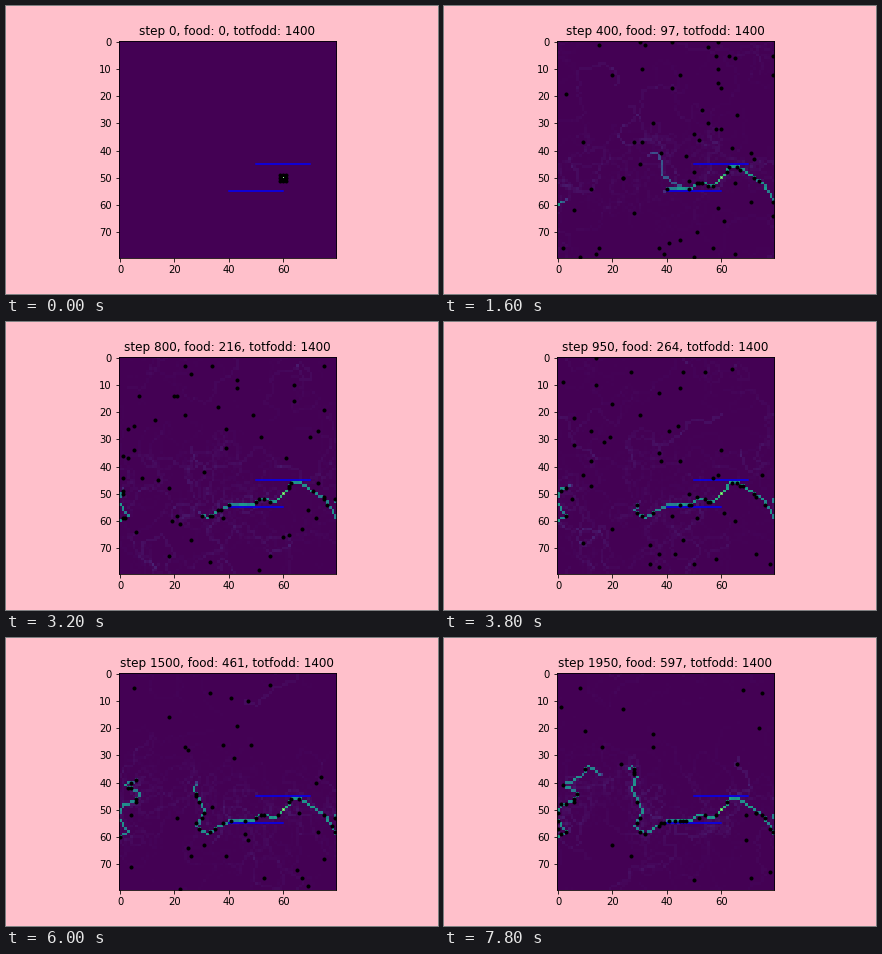
Animation, 432 px wide and 288 px high, one loop 8000 ms. Source, as a matplotlib script:

```python
import numpy as np
import matplotlib.pyplot as plt
from matplotlib.animation import FuncAnimation

N = 80
STEP = 50
FRAMES = 40
GROWTH = 0.0247  # trail cells gained per step
NEST = (60, 50)

# Key points of each trail in grid cells; x runs past the edge where the world wraps.
EAST = [NEST, (63, 46), (66, 46), (75, 52), (80, 60), (83, 58), (79, 53),
        (81, 48), (86, 47), (87, 44), (82, 41), (88, 38), (91, 34), (97, 38)]
WEST = [NEST, (57, 53), (52, 52), (48, 54), (40, 54), (32, 59), (28, 56),
        (31, 51), (27, 42), (29, 38), (27, 34), (25, 36)]
DETOUR = [(46, 54), (38, 49), (38, 44), (36, 41), (31, 42)]

# Food gathered so far, (step, count)
FOOD = np.array([(0, 0), (400, 97), (600, 153), (950, 264),
                 (1300, 392), (1700, 530), (1950, 597)]).T


def raster(points):
    """Grid cells along a polyline, as columns x and y."""
    cells = []
    for a, b in zip(points, points[1:]):
        n = np.abs(np.subtract(b, a)).max()
        cells.append(np.linspace(a, b, n, endpoint=False))
    return np.rint(np.vstack(cells)).astype(int) % N


def make_wisp(rng):
    """A faint curling track that starts near a trail or anywhere."""
    if rng.random() < 0.5:
        trail = east if rng.random() < 0.5 else west
        start = trail[rng.integers(len(trail))]
    else:
        start = rng.uniform(0, N, 2)
    turn = rng.uniform(0, 2 * np.pi) + np.cumsum(rng.normal(0, 0.55, 50))
    path = start + np.cumsum(np.stack([np.cos(turn), np.sin(turn)], 1), 0)
    level = rng.uniform(0.01, 0.06) * np.linspace(1, 0.3, 50)
    return rng.uniform(0, FRAMES * STEP), np.rint(path).astype(int) % N, level


rng = np.random.default_rng(7)
east, west, detour = map(raster, (EAST, WEST, DETOUR))
grain = rng.uniform(0.85, 1.12, (N, N))
wisps = [make_wisp(rng) for _ in range(260)]


def head(step, lead):
    """Length of a trail in cells."""
    return min(1, step / 300) * (lead + GROWTH * step)


def lay(grid, trail, length, level):
    x, y = trail.T
    i = np.arange(len(trail))
    near = 1 + 0.25 * np.exp(-i / 6)
    value = level * near * np.clip((length - i) / 3, 0, 1) * grain[y, x]
    np.maximum.at(grid, (y, x), value)


def scent(step):
    grid = np.zeros((N, N))
    for born, path, level in wisps:
        age = step - born
        if age > 0:
            fade = min(1, age / 40) * np.exp(-age / 220)
            np.add.at(grid, (path[:, 1], path[:, 0]), level * fade)
    grid = np.minimum(grid, 0.15)
    lay(grid, east, head(step, 18), 0.48)
    lay(grid, west, head(step, 12), 0.48)
    lay(grid, detour, step / 20, 0.25 * np.exp(-((step - 400) / 170) ** 2))
    grid[NEST[1], NEST[0]] = 0.75
    return grid


def ants(step):
    if step == 0:
        return [(NEST[0] + dx, NEST[1] + dy) for dx in (-1, 0, 1) for dy in (-1, 0, 1)]
    rng = np.random.default_rng(100 + step)
    reach = 40 * min(1, step / 250)
    roam = NEST + rng.uniform(-reach, reach, (int(70 - step * 0.024), 2))
    groups = [np.rint(roam).astype(int) % N]
    for trail, lead in ((east, 18), (west, 12)):
        live = trail[2:int(head(step, lead))]
        count = min(len(live), 5 + step // 160)
        groups.append(rng.choice(live, count, replace=False))
    return np.vstack(groups)


plt.rcParams["font.family"] = "DejaVu Sans"
fig = plt.figure(figsize=(6, 4), dpi=72, facecolor="pink")
fig.subplots_adjust(left=0.125, right=0.9, bottom=0.125, top=0.88)
ax = fig.add_subplot()
image = ax.imshow(np.zeros((N, N)), cmap="viridis", vmin=0, vmax=1,
                  interpolation="nearest")
for left, y in ((50, 45), (40, 55)):
    ax.plot([left, left + 20], [y, y], "b", lw=1.5)
dots, = ax.plot([], [], "k.", ms=6)
ax.plot(*NEST, ",", color="palegreen")
title = ax.set_title("", fontsize=12)
ax.set(xlim=(-0.5, N - 0.5), ylim=(N - 0.5, -0.5),
       xticks=range(0, N, 20), yticks=range(0, N, 10))


def draw(frame):
    step = frame * STEP
    image.set_data(scent(step))
    dots.set_data(*np.transpose(ants(step)))
    food = round(np.interp(step, *FOOD))
    title.set_text(f"step {step}, food: {food}, totfodd: 1400")
    return image, dots, title


anim = FuncAnimation(fig, draw, frames=FRAMES, interval=200,
                     repeat=True, repeat_delay=0)
plt.show()
```
